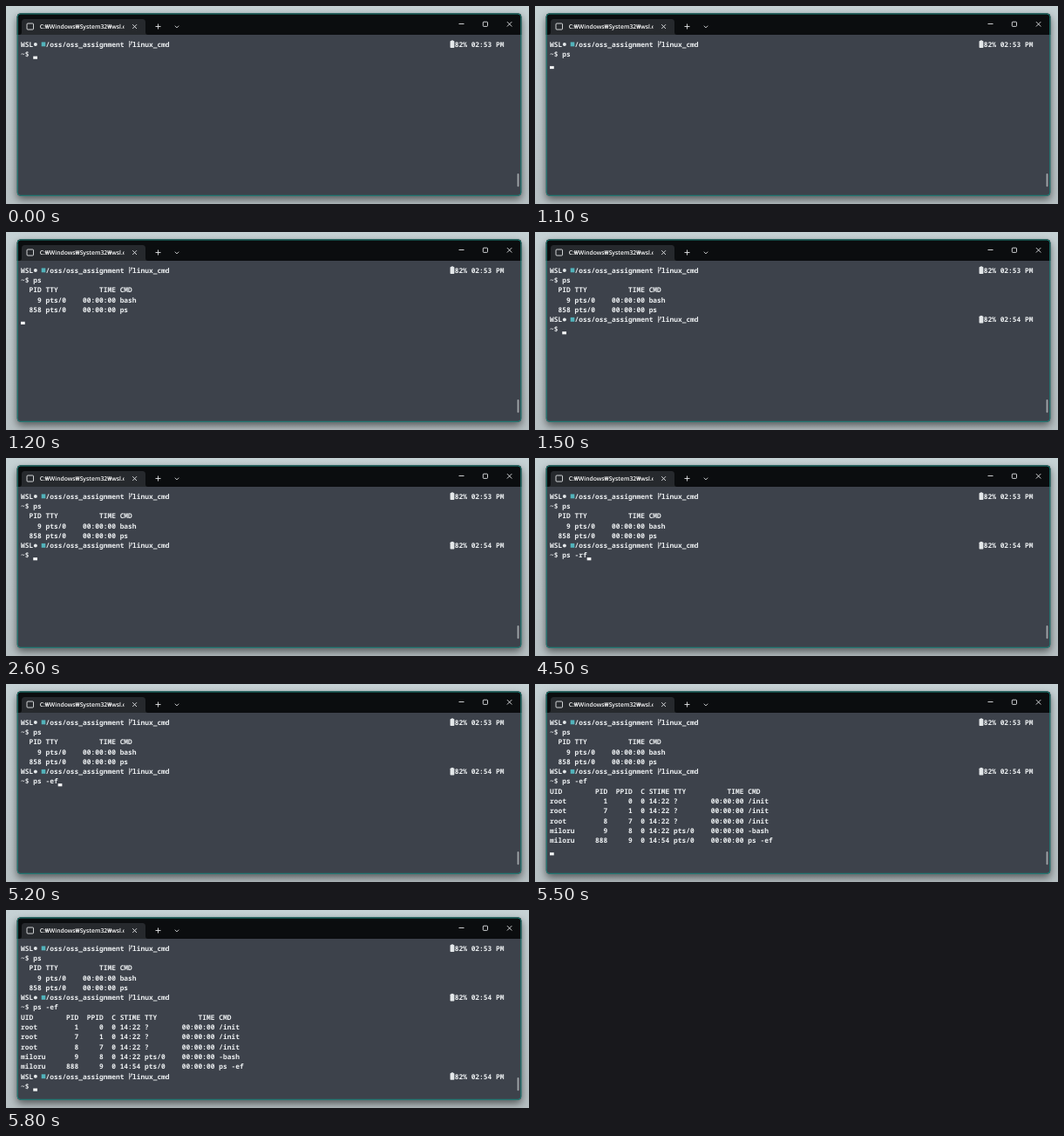
An HTML page that plays this animation: 600 by 227 pixels, repeating every 7400 ms.

```html
<!DOCTYPE html>
<html lang="en">
<head>
<meta charset="utf-8">
<title>Terminal session</title>
<style>
  html, body { margin: 0; width: 100%; height: 100%; overflow: hidden; background: #bccacf; }
  svg { display: block; width: 100vw; height: 100vh; }
  text { white-space: pre; text-rendering: geometricPrecision; }
  .shadow { filter: drop-shadow(0 4px 5px rgba(0, 0, 0, .55)); }
  .mono { font: 600 7.9px "Noto Sans Mono", "DejaVu Sans Mono", monospace; fill: #eceff1; }
  .title { font: 600 6.8px "Open Sans", "Noto Sans", sans-serif; fill: #fff; }
  .line { fill: none; stroke: #e4e6e8; stroke-width: .9; }
</style>
</head>
<body>
<svg viewBox="0 0 600 227" preserveAspectRatio="none">
  <defs>
    <linearGradient id="desk" x1="0" y1="0" x2="0" y2="1">
      <stop offset="0" stop-color="#c6d2d5"/>
      <stop offset="1" stop-color="#b7c0c3"/>
    </linearGradient>
    <clipPath id="tabClip"><rect x="36" y="15" width="99.5" height="18"/></clipPath>
  </defs>

  <rect width="600" height="227" fill="url(#desk)"/>
  <rect class="shadow" x="12.7" y="8.5" width="578.6" height="209.3" rx="4" fill="#3d424b"/>
  <path d="M12.7 33V12.500a4 4 0 0 1 4-4H587.300a4 4 0 0 1 4 4V33Z" fill="#0b0d0f"/>
  <path d="M15 33q3 0 3-3V18.500q0-3.500 3.500-3.500H156.500q3.500 0 3.500 3.500V30q0 3 3 3Z" fill="#26292d"/>
  <rect x="13.2" y="9" width="577.6" height="208.3" rx="3.6" fill="none" stroke="#1c857c"/>

  <rect x="24" y="20" width="7.5" height="7" rx="1" class="line"/>
  <text class="title" x="38.7" y="26.2" clip-path="url(#tabClip)">C:₩Windows₩System32₩wsl.exe</text>
  <g class="line">
    <path d="M145.2 21.200l4.800 4.800m0-4.800l-4.800 4.800"/>
    <path d="M171.500 23.500h6m-3-3v6"/>
    <path d="M193.800 22.700l2.200 2.200l2.200-2.200"/>
    <path d="M519.500 20.500h6"/>
    <rect x="547.3" y="18.2" width="5.2" height="5.200" rx=".8"/>
    <path d="M574.900 18.100l5.400 5.400m0-5.400l-5.400 5.400"/>
  </g>
  <rect x="586.6" y="192" width="1.8" height="15.200" rx=".9" fill="#a3a7ab"/>

  <g id="screen"></g>
  <rect id="cursor" width="4.74" height="3.2" fill="#f4f6f7"/>
</svg>

<script>
const LOOP = 7400;
const CELL = 4.74, PITCH = 11.3, LEFT = 17, BASE = 46.6;
const colX = col => LEFT + col * CELL;
const rowY = row => BASE + row * PITCH;

const screen = document.getElementById("screen");
const cursor = document.getElementById("cursor");
const timed = [];

function add(parent, tag, attrs, text = "") {
  const el = document.createElementNS("http://www.w3.org/2000/svg", tag);
  for (const key in attrs) el.setAttribute(key, attrs[key]);
  el.textContent = text;
  return parent.appendChild(el);
}

function group(from) {
  const el = add(screen, "g", {});
  timed.push({ el, from });
  return el;
}

function write(parent, row, text, col = 0) {
  return add(parent, "text", { class: "mono", x: colX(col), y: rowY(row) }, text);
}

function header(row, from, clock) {
  const g = group(from), y = rowY(row);
  write(g, row, "WSL");
  add(g, "circle", { cx: colX(3.55), cy: y - 2.7, r: 2, fill: "#e4e8ea" });
  add(g, "rect", { x: colX(5), y: y - 5.2, width: 4.6, height: 4.9, fill: "#52b3bb" });
  write(g, row, "/oss/oss_assignment", 6);
  add(g, "path", {
    class: "line",
    d: `M${colX(26.3)} ${y - 6.6}v7.4m0-2.6q2.6-.6 2.6-3.6m-1.2 .8l1.2-1.4l1 1.4`
  });
  write(g, row, "linux_cmd", 27);
  add(g, "rect", { x: colX(104) + .8, y: y - 7.2, width: 2.4, height: 1.2, fill: "#e4e8ea" });
  add(g, "rect", { x: colX(104) - .4, y: y - 6.5, width: 4.8, height: 7.8, rx: .7, fill: "#e4e8ea" });
  write(g, row, "82% " + clock, 105);
}

function prompt(row, from) {
  return write(group(from), row, "~$ ");
}

function output(row, from, lines) {
  const g = group(from);
  lines.forEach((line, i) => write(g, row + i, line));
}

header(0, 0, "02:53 PM");
const first = prompt(1, 0);
output(2, 1200, [
  "  PID TTY          TIME CMD",
  "    9 pts/0    00:00:00 bash",
  "  858 pts/0    00:00:00 ps"
]);
header(5, 1400, "02:54 PM");
const second = prompt(6, 1500);
output(7, 5500, [
  "UID        PID  PPID  C STIME TTY          TIME CMD",
  "root         1     0  0 14:22 ?        00:00:00 /init",
  "root         7     1  0 14:22 ?        00:00:00 /init",
  "root         8     7  0 14:22 ?        00:00:00 /init",
  "miloru       9     8  0 14:22 pts/0    00:00:00 -bash",
  "miloru     888     9  0 14:54 pts/0    00:00:00 ps -ef"
]);
header(13, 5700, "02:54 PM");
prompt(14, 5800);

const firstKeys = [[0, ""], [600, "p"], [800, "ps"]];
const secondKeys = [
  [0, ""], [3500, "p"], [3600, "ps"], [3800, "ps "], [4100, "ps -"],
  [4300, "ps -r"], [4500, "ps -rf"], [4900, "ps -r"], [5100, "ps -e"], [5200, "ps -ef"]
];
// time, row, column; a null column follows the typed command
const cursorSteps = [
  [0, 1, null], [1100, 2, 0], [1200, 5, 0], [1400, 6, 0],
  [1500, 6, null], [5500, 13, 0], [5700, 14, 0], [5800, 14, 3]
];

const latest = (steps, t) => steps.filter(step => step[0] <= t).pop();

function draw(t) {
  for (const { el, from } of timed) el.style.display = t >= from ? "" : "none";
  const a = "~$ " + latest(firstKeys, t)[1];
  const b = "~$ " + latest(secondKeys, t)[1];
  first.textContent = a;
  second.textContent = b;
  const [, row, col] = latest(cursorSteps, t);
  cursor.setAttribute("x", colX(col ?? (row === 1 ? a : b).length));
  cursor.setAttribute("y", rowY(row) - .3);
}

const start = performance.now();
function tick() {
  draw((performance.now() - start) % LOOP);
  requestAnimationFrame(tick);
}
tick();
</script>
</body>
</html>
```
